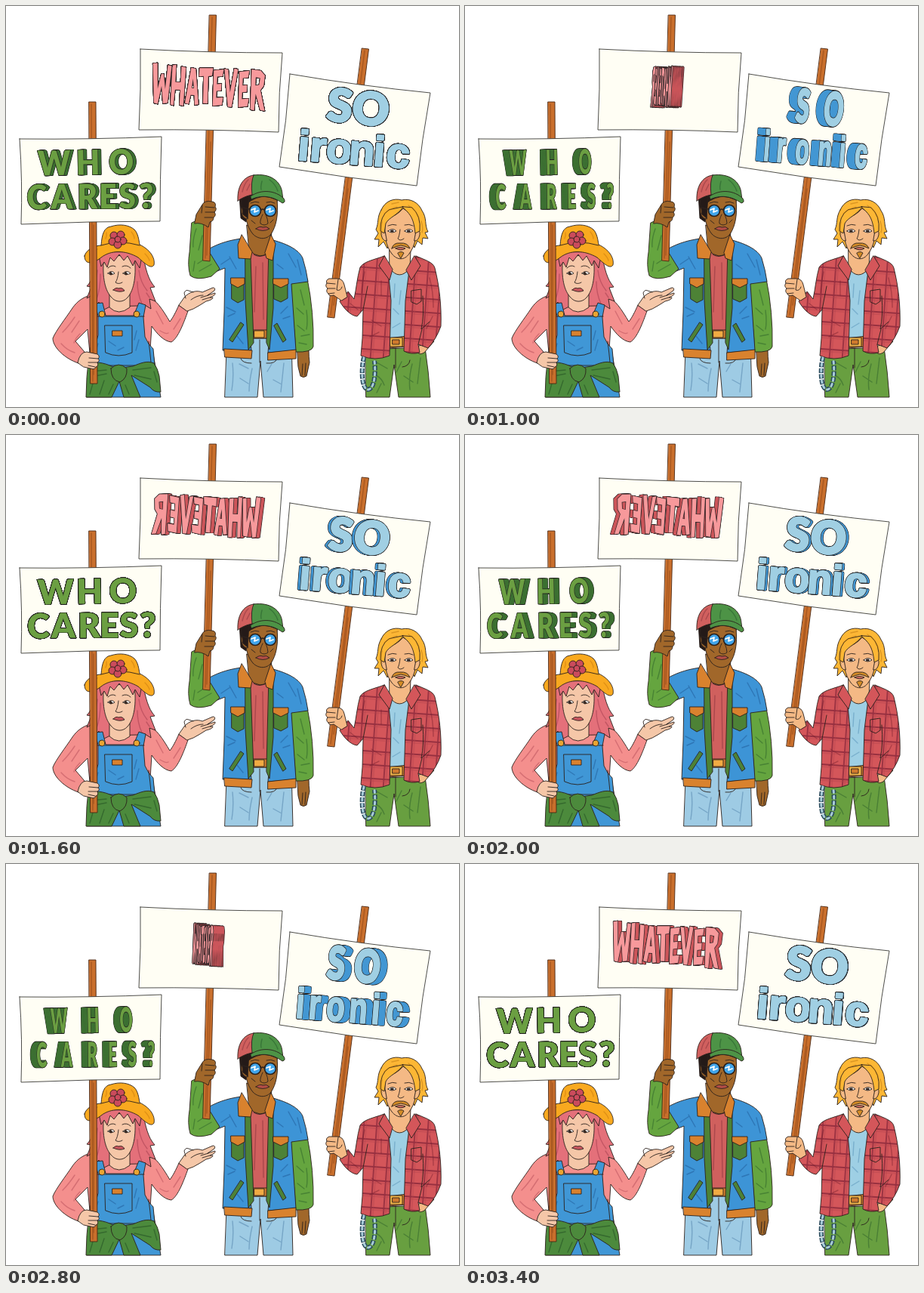
An HTML page that plays this animation: 600 by 531 pixels, repeating every 3.6 s.

```html
<!DOCTYPE html>
<html lang="en">
<head>
<meta charset="utf-8">
<title>Three signs</title>
<style>
html,body{margin:0;width:100%;height:100%;overflow:hidden;background:#fff}
svg{display:block;width:100vw;height:100vh}
#scene{stroke:#2b211c;stroke-width:.9;stroke-linejoin:round;stroke-linecap:round}
.l{fill:none}
.fold{fill:none;stroke-width:1.4;opacity:.4}
.pole{fill:#c96f2c;stroke:#4a2814}
.sign{fill:#fffef4;stroke:#3a3a38}
.glyph{vector-effect:non-scaling-stroke;text-anchor:middle;fill-rule:evenodd}
.green{font:900 45px Lato,sans-serif}
.blue{font:bold 56px "Liberation Sans",Arial,sans-serif}
.big{font:900 60px Lato,sans-serif}
</style>
</head>
<body>
<svg viewBox="0 0 600 531">
<defs id="defs">
<pattern id="plaid" width="17" height="18" patternUnits="userSpaceOnUse" patternTransform="rotate(4)">
<path d="M0 0h17v18H0z" fill="#d4565a" stroke="none"/>
<path d="M4 0v18M0 6h17" stroke="#973040" stroke-width="1.8"/>
<path d="M7 0v18M0 9h17" stroke="#b0404a" stroke-width=".7"/>
</pattern>
</defs>
<g id="scene">

<!-- woman -->
<g>
<path fill="#4097d6" d="M112 455L194 455L205 518H107Z"/>
<path fill="#f48f8d" d="M127 380C105 382 95 390 88 400C78 415 66 430 62 440C62 452 78 467 96 473L104 458L92 444L108 428L112 470H190L193 424C200 434 209 444 219 445C228 440 236 418 241 404L229 396C225 405 221 413 217 418C208 403 199 388 186 383C170 378 145 377 127 380Z"/>
<path class="fold" stroke="#a63c4c" d="M91 412q-8 12-16 20M97 417l-10 15M98 434q-6 6-8 12M199 404l9 17M204 430q8 5 11 3M222 428l9-14M73 447q8 9 18 12"/>
<path fill="#e4707a" d="M117 333C119 355 112 366 107 371L113 372L107 387L115 383L114 401L123 392L126 404L138 398L175 397L181 405L184 396L192 401L190 388L198 391L191 373L197 372C188 362 185 348 181 328Z"/>
<path fill="#f5c7a8" d="M137 380V399Q149 411 164 399V380Z"/>
<path fill="#f5c7a8" d="M130 331C127 355 130 375 139 385C145 393 155 393 161 386C170 376 173 355 170 331Z"/>
<path fill="#e4707a" d="M122 326L126 345L130 339L134 346L138 333L143 338L150 329L156 337L161 331L168 344L171 337L177 347L181 326Z"/>
<path class="fold" stroke="#8e2e42" d="M121 350q-1 15-7 24M125 355q0 20-5 33M176 350q2 16 11 27M174 365q0 16 6 29M186 380l4 6"/>
<path class="l" d="M135 347q5-5 10-2M154 345q6-3 11 2M149 352q-1 10-4 14q4 3 9 0"/>
<path fill="#fff" d="M135 354q5-5 9 0q-4 3-9 0ZM155 354q5-5 10 0q-5 3-10 0Z"/>
<path d="M139 352a2 2 0 1 0 2 2.500M159 352a2 2 0 1 0 2 2.500" fill="#3a2a22"/>
<path fill="#c9575f" d="M142 376q4-4 7-2q5-2 8 3q-7 3-15-1Z"/>
<path fill="#f9a91f" d="M104 331C106 322 119 317 126 317C127 302 130 293 139 292C151 288 163 290 170 296C175 301 176 310 177 316C190 322 198 333 196 343C192 349 184 341 175 333C158 323 139 323 126 333C116 341 104 344 104 331Z"/>
<path class="l" d="M126 317Q150 309 177 317"/>
<path class="fold" stroke="#b86c0c" d="M111 329q4-5 10-7M184 328q5 5 6 9M166 299q4 5 4 9M133 300q1 4-1 8"/>
<g fill="#cb4b5c"><circle cx="143" cy="304" r="5"/><circle cx="152" cy="303" r="5"/><circle cx="141" cy="312" r="5"/><circle cx="155" cy="311" r="5"/><circle cx="148" cy="316" r="5"/><circle cx="148" cy="309" r="4"/></g>
<path fill="#4097d6" d="M118 394L128 393L132 410H169L176 393L185 396L182 412L184 438Q188 448 195 454L197 476H109L112 452Q120 446 122 436V411Z"/>
<path class="l" d="M121 411H183M131 423H167V459Q149 467 132 459ZM117 444q-2 16-3 28M189 444q2 16 3 28"/>
<circle cx="127" cy="408" r="4" fill="#e9a532"/><circle cx="173" cy="408" r="4" fill="#e9a532"/>
<path fill="#d9822e" d="M141 430H154V437H141Z"/>
<path class="fold" stroke="#174a86" d="M136 444l9 6M156 452l-8 4M173 430l-3 12M176 442l-4 14M122 447l-4 13"/>
<path fill="#4c8a3c" d="M109 474C120 469 135 474 146 480L168 477C178 473 187 469 196 473Q201 480 203 490L205 511Q196 512 191 505L166 489L178 518H156L150 497L140 518H106L107 492Z"/>
<path fill="#4c8a3c" d="M139 480Q149 470 160 480Q161 493 151 498Q139 496 139 480Z"/>
<path class="fold" stroke="#12371a" d="M112 484l21-2M113 491l20-4M168 482l24-3M170 489l22 5M196 484l4 14M115 500l-4 14M130 496l-6 18M142 501l-6 13M158 502l5 12"/>
<path fill="#f5c7a8" d="M229 396L236 386C243 378 253 376 260 379L274 373Q278 373 276 377L267 383L277 380Q278 383 270 386L274 386Q274 389 265 391L257 396Q248 402 240 404Z"/>
<path class="l" d="M245 389q8-6 16-6M258 386l10-3M260 389l10-3M238 387l-2-7q2-5 6-3l6 2"/>
<path class="pole" d="M110 127H119L121 500H112Z"/>
<path class="fold" stroke="#74360f" d="M113 130L115 497M116 290V488"/>
<path fill="#f5c7a8" d="M95 472Q98 458 107 458L121 461Q125 464 122 467Q125 470 121 472Q123 477 119 478Q118 482 112 480L103 478Z"/>
<path class="l" d="M110 466l12 1M109 472l12 0M109 476l9 2"/>
</g>

<!-- man in the cap -->
<g>
<path fill="#9ecbe4" d="M293 440H378L380 518H341L337 470L333 518H290Z"/>
<path class="fold" stroke="#3b6d99" d="M300 473q2 18-1 36M309 474l12 6M326 480q-4 18-4 30M352 474l-6 10M368 473l-4 38M310 493l11 7M354 495l11 6"/>
<path class="l" d="M336 442V472M345 473q12 1 14-6M325 473q-12 0-14-6"/>
<path fill="#a1672a" d="M386 456L401 455Q401 465 402 472L398 490Q394 493 390 490L387 478Z"/>
<path class="l" d="M393 474l-1 15M397 473l-1 16"/>
<path fill="#65a53f" d="M375 366L399 361Q408 405 407 451Q405 459 383 458Q384 430 377 403Z"/>
<path class="fold" stroke="#1c4e23" d="M390 376l5 20M385 400l9 8M398 403q2 16 0 25M386 423l9 7M391 437l11-2M388 446l10 2"/>
<path fill="#d0605e" d="M319 320H354L356 432H322Z"/>
<path fill="#d9822e" d="M323 429H350V440H323Z"/>
<path fill="#f1ab43" d="M329 430H342V439H329Z"/>
<path fill="#a1672a" d="M319 290H352L351 325Q336 338 322 323Z"/>
<path fill="#3d94d6" d="M311 308C298 310 284 313 268 322L262 358L290 347L289 405L287 456H325L319 380L319 327Z"/>
<path fill="#3d94d6" d="M350 309C370 314 388 322 393 334Q398 350 400 365L378 368L384 456L347 459L353 380L350 327Z"/>
<path fill="#65a53f" d="M246 287Q257 280 269 288L270 327L283 348L272 358Q252 364 244 357Q240 344 243 326Z"/>
<path class="fold" stroke="#1c4e23" d="M252 295q-5 14-4 24M260 304l-5 19M266 333l-12 8M272 342l-16 9M250 338l-2 13"/>
<path fill="#4d8236" d="M317 331L324 333L328 446L321 455L317 390Z"/><path fill="#4d8236" d="M348 333L354 330L354 400L349 455L345 446Z"/>
<path fill="#d9822e" d="M312 303L307 316L308 334L324 335L326 326ZM351 303L357 315L353 337L345 334L343 327Z"/>
<path class="l" d="M328 329q8 5 16 0"/>
<path class="fold" stroke="#712532" d="M331 345l-2 60M340 340l1 75"/>
<path fill="#4d8236" d="M299 362H315V389L307 393L299 388ZM355 363H373V387L364 392L355 388Z"/>
<path fill="#d9822e" d="M298 360H316V368L307 373L298 368ZM354 361H374V368L364 373L354 368Z"/>
<path fill="#4d8236" d="M311 419l4 3l-15 23l-4-3ZM355 423l4-3l12 22l-4 3Z"/>
<path fill="#d9822e" d="M289 454L326 456L325 467L290 465ZM347 459L384 455V467L347 469Z"/>
<path class="fold" stroke="#174a86" d="M296 332l9 16M285 342l12-8M292 399l12 6M294 411l9-4M374 328l10 18M386 336l5 20M373 398l-9 9M376 411l-9 3M306 437l8 10M359 342l8 6"/>
<path fill="#241a18" d="M309 248L311 281L318 286L321 262H350L358 264L361 250Z"/>
<path fill="#a1672a" d="M319 262C315 278 319 292 327 302C335 310 346 309 351 302C358 292 361 276 359 257L346 252Q330 252 319 262Z"/>
<path fill="#a1672a" d="M318 265q-9-1-6 9q2 8 8 8Z"/>
<path fill="#241a18" d="M311 252L322 251L320 281L314 276Z"/>
<path fill="#d0605e" d="M307 258C306 239 314 226 328 224L341 227L333 249Q318 250 307 258Z"/>
<path fill="#4d9346" d="M328 224C350 221 365 232 366 249L367 256L326 250Q324 233 328 224Z"/>
<path fill="#4d9346" d="M324 252C338 242 357 244 368 255Q371 260 366 261C352 251 338 250 325 256Z"/>
<path class="fold" stroke="#712532" d="M313 246q3-12 8-16M319 244l4-8"/>
<path class="fold" stroke="#184823" d="M349 230q8 6 11 15M339 232q-2 8-1 11"/>
<path class="l" d="M324 261q6-3 11-1M345 260q6-2 11 1M340 276q-4 8-3 12q5 4 10 0q0-5-3-12M325 284l5 4M354 283l-4 4"/>
<path fill="#b24d45" d="M331 295q5-4 9-2q5-2 9 2q-9 5-18 0Z"/>
<g fill="#41a5ea" stroke-width="1.700"><circle cx="330" cy="271" r="7.500"/><circle cx="350" cy="271" r="7.500"/></g>
<path class="l" stroke-width="1.600" d="M338 270q2-2 4 0M322 269l-8-2"/>
<path class="l" stroke="#fff" stroke-width="1.700" d="M325 270l5-2l-1 5l5-2M345 270l5-2l-1 5l5-2"/>
<path class="pole" d="M269.500 12H278.500L270 338L261 337Z"/>
<path class="fold" stroke="#74360f" d="M273 15L264 334M271 180L266 330"/>
<path fill="#a1672a" d="M250 286L252 276L260 263Q263 257 273 259Q279 260 277 266Q280 269 276 273Q279 277 275 280Q275 285 270 286L268 293Q258 286 250 288Z"/>
<path class="l" d="M264 266l12 1M264 273l12 0M263 280l11 0M260 264l-1 10"/>
</g>

<!-- man in plaid -->
<g>
<path fill="#689f40" d="M476 455L555 452Q560 485 562 518H520L514 475L508 518H477Z"/>
<path class="fold" stroke="#1c4e23" d="M491 472l14 8M490 489q8 4 11 13M524 471l-7 14M538 474q-5 19-3 34M549 466l-4 34M527 490l12 8M497 500l-6 12"/>
<path class="l" d="M516 453V479M525 478q9-1 10-9"/>
<path fill="#9ecfe4" d="M506 344H535L532 440L506 442Z"/>
<path class="fold" stroke="#4180aa" d="M515 368l-1 18M523 377l-2 18M513 401l7 7M522 420l-10 6"/>
<path fill="#d17a2d" d="M505 440L532 437V451L506 453Z"/><path fill="#f0b348" d="M509 439H525V451H509Z"/><path fill="#d17a2d" d="M512 442H521V448H512Z"/>
<path fill="#f4b985" d="M547 450L567 444L554 459Q547 463 545 458Z"/>
<path fill="url(#plaid)" d="M501 331C488 336 474 338 469 346C465 360 464 374 461 388L453 378L442 391C447 400 456 410 465 411L473 402L472 440L470 463Q489 471 508 463L510 390L506 348Z"/>
<path fill="url(#plaid)" d="M543 331C554 336 566 339 568 347C574 371 577 397 576 424Q570 441 559 453L546 448L548 459Q536 462 527 457L529 390L534 350Z"/>
<path class="l" d="M473 402L479 371M552 384Q554 410 550 428L561 418M546 448L551 428M537 377l13-2v16l-6 4l-7-3Z"/>
<path class="fold" stroke="#701d2c" d="M475 352q-4 17-4 28M484 416l13 8M482 438l12-6M561 360q5 18 5 39M565 411l-8 16M456 394l10 8M497 364v19"/>
<path fill="#f4b985" d="M508 323H536L535 347Q521 365 508 347Z"/>
<path fill="#d4565a" d="M501 331L494 344L508 363L512 349ZM541 331L549 344L537 363L530 350Z"/>
<path fill="#fdb735" d="M497 270C502 258 514 254 524 257C536 254 547 261 551 271C558 281 554 290 559 299L555 300L559 308L552 307L551 316L545 311L541 320L536 309L509 309L505 321L500 312L493 319L494 309L488 309L493 301L490 296C494 287 491 280 497 270Z"/>
<path fill="#f4b985" d="M503 281C500 302 503 318 511 328C518 337 528 337 534 328C542 318 546 301 541 279Q533 273 526 268Q517 279 503 281Z"/>
<path fill="#f4b985" d="M502 299q-6-4-5 4q2 9 7 8ZM543 299q6-4 5 4q-2 9-7 8Z"/>
<path fill="#fdb735" d="M526 266C519 277 507 280 503 288L501 301L496 298Q495 278 507 270ZM525 266C533 274 540 278 542 301L548 298Q550 278 538 267Z"/>
<path class="fold" stroke="#a96609" d="M501 275q8-7 17-9M498 286q-2 11 0 16M533 264q11 7 14 17M550 285q3 9 1 15M511 262l9-2"/>
<path class="l" d="M506 291q6-3 11-1M528 290q6-2 11 1M522 296q-1 9-3 12q3 4 8 0"/>
<path fill="#fff" d="M506 298q6-5 11 0q-6 4-11 0ZM528 298q6-5 11 0q-6 4-11 0Z"/>
<path fill="#3a2a22" d="M510 297h3v2h-3ZM532 297h3v2h-3Z"/>
<path fill="#d28b26" d="M511 321Q513 313 522 314Q532 313 535 321Q529 318 523 317Q517 318 511 321Z"/>
<path fill="#c9685d" d="M516 321q6-3 13 0q-6 4-13 0Z"/>
<path fill="#d28b26" d="M519 327q4-3 8 0l-4 7Z"/>
<path class="l" stroke="#27485a" stroke-width="6" stroke-dasharray="6 1.500" stroke-linecap="butt" d="M474 465C470 482 471 506 479 508C488 508 490 486 488 470"/>
<path class="l" stroke="#a8cbd8" stroke-width="3" stroke-dasharray="3 4.500" d="M474 466C470 482 471 506 479 508C488 508 490 486 488 470"/>
<path class="pole" d="M471.500 56L480.500 57L435 413L426 412Z"/>
<path class="fold" stroke="#74360f" d="M475 59L430 409M453 242L434 396"/>
<path fill="#f4b985" d="M452 385L448 369Q446 361 439 361L428 361Q423 363 425 367Q422 371 426 374Q423 378 427 381Q428 385 434 383L444 390Z"/>
<path class="l" d="M425 367l11 1M426 374l10 0M427 381l8-1M440 362l-2 14q5 2 7-4"/>
</g>

<path class="sign" d="M18 176Q110 177 206 173Q204 230 204 285Q110 285 20 289Q22 232 18 176Z"/>
<path class="sign" d="M178 57Q270 62 366 62Q361 115 361 167Q270 163 176 164Q179 110 178 57Z"/>
<path class="sign" d="M376 90Q470 106 562 115Q551 176 544 238Q452 228 362 213Q372 152 376 90Z"/>
</g>
<g id="words" stroke="#211f20" stroke-linejoin="round"></g>
</svg>
<script>
const NS = 'http://www.w3.org/2000/svg', LAYERS = 8, STEP = 200, LOOP = 3600, INK = '#211f20';
const defs = document.getElementById('defs'), words = document.getElementById('words');
let count = 0;

function add(parent, tag, attrs) {
  const el = document.createElementNS(NS, tag);
  for (const k in attrs) el.setAttribute(k, attrs[k]);
  return parent.appendChild(el);
}

// A letter is a dark stack of slices with an outlined face in front.
function letter(parent, glyph, x, {depth, face, side, fat}) {
  glyph.id = 'g' + count++;
  const g = add(parent, 'g', {}), slices = [];
  const slice = (level, color, width) => slices.push({
    level,
    el: add(g, 'use', {href: '#' + glyph.id, fill: color, stroke: color, 'stroke-width': width})
  });
  for (let i = 0; i <= LAYERS; i++) slice(i, INK, fat + 1.3);
  for (let i = 0; i < LAYERS; i++) slice(i, side, fat);
  slice(LAYERS, INK, fat + 1.3);
  slice(LAYERS, face, fat);
  return {g, x, depth, slices};
}

function turn(l, deg) {
  const a = deg * Math.PI / 180, c = Math.cos(a), s = Math.sin(a), dir = c < 0 ? -1 : 1;
  for (const {level, el} of l.slices) {
    const z = (level / LAYERS - 0.5) * l.depth * dir;
    el.setAttribute('transform', `matrix(${c} 0 0 1 ${l.x * c + z * s} 0)`);
  }
}

function row(str, xs, y, slope, cls, style) {
  return [...str].map((ch, i) => {
    const glyph = add(defs, 'text', {class: 'glyph ' + cls});
    glyph.textContent = ch;
    const dy = (xs[i] - xs[0]) * Math.tan(slope * Math.PI / 180);
    const g = add(words, 'g', {transform: `translate(${xs[i]} ${y + dy}) rotate(${slope})`});
    return letter(g, glyph, 0, style);
  });
}

const GREEN = {face: '#6b9f42', side: '#3d7033', depth: 10, fat: 0.2};
const BLUE = {face: '#a0cfe3', side: '#4397d3', depth: 13, fat: 2.4};
const PINK = {face: '#f7999b', side: '#cc565c', depth: 15, fat: 0.1};

const cares = [
  ...row('WHO', [66, 111, 155], 224, -1, 'green', GREEN),
  ...row('CARES?', [43, 76, 110, 137, 163, 188], 269, -0.5, 'green', GREEN)
];
const ironic = [
  ...row('SO', [440, 481], 153, 6, 'big', BLUE),
  ...row('ironic', [393, 412, 440, 470, 493, 518], 204, 4.5, 'blue', BLUE)
];

const jagged = {
  W: 'M-13-29L-7-30L-5 4L-1-16L2-16L5 4L7-28L12-27L9 22L3 23L0 0L-4 24L-9 23Z',
  H: 'M-9-28L-4-29V-6H3V-27L9-26L8 25L3 24V4H-4L-5 25L-9 24Z',
  A: 'M-3-26L3-25L9 22L4 23L3 10H-2L-4 22L-9 21ZM-1 1H2L0-12Z',
  T: 'M-9-26L9-27L8-17L3-16L4 20H-2L-3-16L-9-15Z',
  E: 'M-6-24L7-26L6-17L-1-16V-6L5-7V2L-1 3V12L8 11L7 21L-5 23Z',
  V: 'M-9-27L-4-26L0 4L4-28L9-27L3 23H-2Z',
  R: 'M-9-28L3-27L9-21L8-7L4-1L11 26L5 25L-2 4L-3 26L-8 25ZM-3-18V-7L2-8L3-17Z'
};
const spinner = add(words, 'g', {transform: 'translate(268 109) rotate(3)', 'aria-label': 'WHATEVER'});
const spots = [-62, -40, -21, -4, 12, 29, 46, 65];
const whatever = [...'WHATEVER'].map((ch, i) =>
  letter(spinner, add(defs, 'path', {class: 'glyph', d: jagged[ch]}), spots[i], PINK));

// One pose per step for the short swing; time and angle pairs for the long one.
const shortSwing = [-25, -44, -20, 14, 43, 62, 45, 20, 0];
const longSwing = [[0, 0], [400, 32], [1000, 58], [1600, 15], [2000, -14], [2800, -45], [3400, -3], [3600, 0]];

function between(keys, t) {
  const i = keys.findIndex(k => k[0] > t), [t0, a0] = keys[i - 1], [t1, a1] = keys[i];
  return a0 + (a1 - a0) * (t - t0) / (t1 - t0);
}

let shown = -1;
function draw(now) {
  const n = Math.floor(now % LOOP / STEP);
  if (n === shown) return;
  shown = n;
  const spin = n * 20;
  whatever.forEach(l => turn(l, spin));
  const order = spin < 180 ? [...whatever].reverse() : whatever;
  order.forEach(l => spinner.appendChild(l.g));
  cares.forEach(l => turn(l, shortSwing[n % shortSwing.length]));
  const sway = between(longSwing, n * STEP);
  ironic.forEach(l => turn(l, sway));
}

const start = performance.now();
function tick() {
  draw(performance.now() - start);
  requestAnimationFrame(tick);
}
tick();
</script>
</body>
</html>
```
